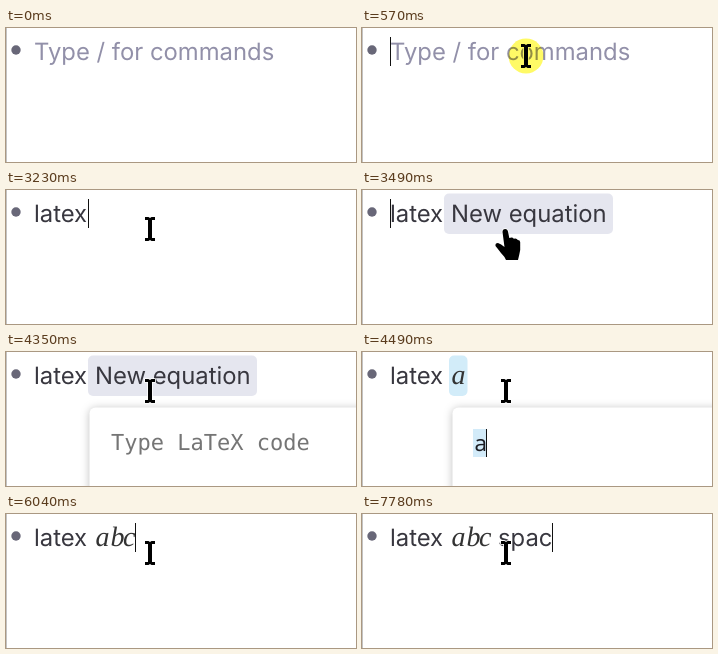
These frames come from a looping animation (350x134 px, 8 s). An HTML page:

```html
<!DOCTYPE html>
<html lang="en">
<head>
<meta charset="utf-8">
<title>Inline equation</title>
<style>
  html, body { margin: 0; width: 100%; height: 100%; overflow: hidden; background: #fff; }
  svg { display: block; width: 350px; height: 134px; }
  text { white-space: pre; text-rendering: geometricPrecision; }
  .ui { font: 23.85px Inter, sans-serif; fill: #38373f; }
  .hint { fill: #9290a9; }
  .code { font: 22px "Noto Sans Mono", monospace; fill: #1c1c22; }
  .empty { font-family: "DejaVu Sans Mono", monospace; fill: #757575; }
  .math { font: italic 28px "Liberation Serif", serif; fill: #333; }
  #panel { fill: #fff; filter: drop-shadow(0 1px 4px rgba(0, 0, 0, .26)); }
  #beam, #hand { stroke: #fff; stroke-width: 1.6; paint-order: stroke; }
  #click { fill: #fffa66; mix-blend-mode: multiply; }
</style>
</head>
<body>
<svg viewBox="0 0 350 134">
  <rect width="350" height="134" fill="#fff"/>
  <rect width="1" height="134" fill="#c3c3c3"/>
  <circle cx="10" cy="22" r="4.7" fill="#686778"/>
  <rect id="chip" y="3.5" height="40.5" rx="5"/>
  <text id="hint" class="ui hint" x="28" y="32">Type / for commands</text>
  <text id="line" class="ui" x="28" y="32"></text>
  <text id="label" class="ui" x="89" y="32">New equation</text>
  <text id="math" class="math" y="32"></text>
  <text id="tail" class="ui" x="136" y="32"></text>
  <g id="popup">
    <rect id="panel" y="55.5" width="400" height="120" rx="6"/>
    <rect id="mark" x="111" y="77" width="14" height="28" fill="#d3ebf9"/>
    <text id="code" class="code"></text>
  </g>
  <rect id="caret" width="1" fill="#111"/>
  <path id="beam" d="M-5-12h3.500l1.500 1 1.500-1H5v3H2V9h3v3H1.500l-1.500-1-1.500 1H-5v-3h3V-9h-3z"/>
  <path id="hand" d="M140.500 42q0-3 2.700-3 2.400 0 2.900 3l1.200 6q3-1.500 4.500.7 2.800-1 4 1.200 2.300 0 2.400 2.300V60q-.7 4-2.200 10h-12q-1-3-5-7-3-4-5.500-7-.5-3 2.500-3 3 1 6.500 4z"/>
  <circle id="click" r="17.5"/>
</svg>
<script>
const LOOP = 8000;
const el = {};
document.querySelectorAll("[id]").forEach(n => el[n.id] = n);

// Each step overrides part of the editor state from its time on.
const steps = [
  [0, { hint: true, line: "", tail: "", caret: 0, chip: "", code: "", px: 0, mark: false }],
  [570, { caret: 28 }],
  [1100, { caret: 0 }],
  [1300, { hint: false, line: "l", caret: 33 }],
  [1430, { line: "la", caret: 46 }],
  [1690, { line: "lat", caret: 55 }],
  [1950, { line: "late", caret: 69 }],
  [2150, { line: "latex", caret: 82 }],
  [2680, { caret: 0 }],
  [3230, { caret: 82 }],
  [3280, { line: "latex$", caret: 97 }],
  [3490, { line: "latex", chip: "new", caret: 28 }],
  [3620, { px: 83, caret: 105 }],
  [4150, { caret: 0 }],
  [4420, { chip: "math", code: "a", px: 90, caret: 124 }],
  [4490, { mark: true }],
  [4820, { mark: false }],
  [5220, { code: "ab", caret: 138 }],
  [5440, { code: "abc", caret: 151 }],
  [5970, { caret: 0 }],
  [6040, { chip: "done", px: 0, caret: 129 }],
  [6570, { caret: 0 }],
  [6970, { tail: "s", caret: 148 }],
  [7250, { tail: "sp", caret: 163 }],
  [7450, { tail: "spa", caret: 176 }],
  [7780, { tail: "spac", caret: 190 }]
];

const show = (node, on) => node.style.display = on ? "" : "none";
const set = (node, attrs) => {
  for (const k in attrs) node.setAttribute(k, attrs[k]);
};
const mix = (a, b, p) => a + (b - a) * p;

// The pointer moves in eight equal ticks: in, click, then aside.
function pointer(t) {
  const k = Math.min(8, Math.floor((t - 130) / 71.25));
  const hand = t >= 3490 && t < 4350;
  const p = 1 - (1 - Math.min(1, k / 5)) ** 1.5;
  const q = Math.max(0, k - 6) / 2;
  const x = mix(mix(223, 164, p), 144, q);
  const y = mix(mix(93, 28, p), 39, q);
  show(el.beam, k >= 0 && !hand);
  show(el.hand, hand);
  show(el.click, k === 5 || k === 6);
  set(el.beam, { transform: `translate(${x} ${y})` });
  set(el.click, { cx: x, cy: y });
}

function draw(t) {
  const s = {};
  for (const [at, change] of steps) if (t >= at) Object.assign(s, change);

  show(el.hint, s.hint);
  el.line.textContent = s.line;
  el.tail.textContent = s.tail;

  const n = s.code.length;
  const isNew = s.chip === "new";
  const right = [0, 105.5, 118, 130.5][n];
  el.math.textContent = s.code;
  set(el.math, { x: [89.5, 104.5, 117].slice(0, n).join(" ") });
  show(el.label, isNew);
  show(el.chip, isNew || s.chip === "math");
  if (isNew) set(el.chip, { x: 82, width: 169, fill: "#e5e6ef" });
  else if (n) set(el.chip, { x: 87, width: right - 87, fill: "#d2ecf9" });

  show(el.popup, s.px > 0);
  show(el.mark, s.mark);
  set(el.panel, { x: s.px + 0.5 });
  set(el.code, { x: s.px + 22, y: n ? 99 : 98 });
  el.code.textContent = s.code || "Type LaTeX code";
  el.code.classList.toggle("empty", !n);

  const top = s.px ? (n ? 77 : 76) : 9;
  show(el.caret, s.caret > 0);
  set(el.caret, { x: s.caret, y: top, height: s.px ? 28 : 29 });

  pointer(t);
}

const start = performance.now();
function tick() {
  draw((performance.now() - start) % LOOP);
  requestAnimationFrame(tick);
}
tick();
</script>
</body>
</html>
```
